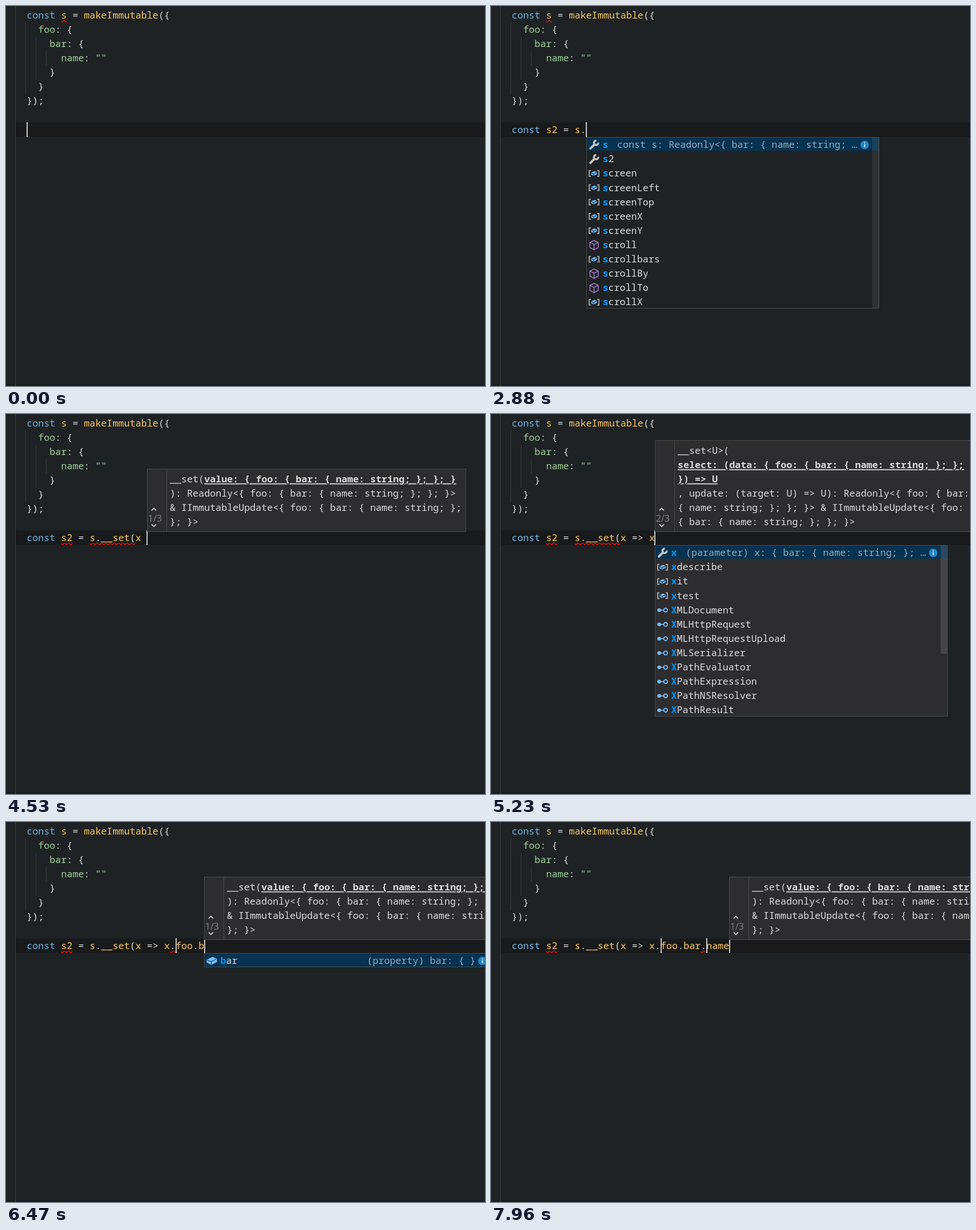
Animation of 839 by 667 pixels, one loop 8000 ms. Source, as an HTML page with a canvas:

```html
<!DOCTYPE html>
<html lang="en">
<head>
<meta charset="utf-8">
<title>Code completion</title>
<style>
html, body { margin: 0; width: 100%; height: 100%; overflow: hidden; background: #1e2224; }
canvas { display: block; }
</style>
</head>
<body>
<canvas id="stage" width="839" height="667"></canvas>
<script>
const g = document.getElementById('stage').getContext('2d');
const LOOP = 8000, SIZE = 16.72, CHAR = SIZE * 0.6, LINE = 25.1, LEFT = 36.2;
const MONO = '"Noto Sans Mono", "DejaVu Sans Mono", monospace';
const WHITE = '#dcdcdc', YELLOW = '#fac863', GREEN = '#9fd39a', BLUE = '#6cb5e4';
const PAGE = '#1e2224', PANEL = '#2d2d30', BORDER = '#4a4a4a', LIGHT_BLUE = '#75beff', GREY = '#c5c5c5';

const HEAD = ['const s = makeImmutable({', '  foo: {', '    bar: {', '      name: ""', '    }', '  }', '});'];
const TYPED = 'const s2 = s.__set(x => x.foo.bar.name';

const row = icon => label => ({ icon, label });
const globals = 'xdescribe xit xtest'.split(' ').map(row('variable'));
const types = ('XMLDocument XMLHttpRequest XMLHttpRequestUpload XMLSerializer XPathEvaluator ' +
  'XPathExpression XPathNSResolver XPathResult').split(' ').map(row('type'));
const starting = [row('keyword')('const'),
  ...('ConstantSourceNode ConstantSourceOptions ConstrainBooleanParameters ConstrainDOMString ' +
  'ConstrainDoubleRange ConstrainULongRange Console').split(' ').map(row('type')),
  row('variable')('console'), row('keyword')('continue'), row('method')('confirm'), row('type')('ConvolverNode')];

const LISTS = {
  con: { rows: starting, detail: 'const' },
  const: { rows: starting.slice(0, 7), detail: 'const' },
  s: {
    detail: 'const s: Readonly<{ bar: { name: string; …',
    rows: 's s2 screen screenLeft screenTop screenX screenY scroll scrollbars scrollBy scrollTo scrollX'
      .split(' ').map((label, i) => row(i < 2 ? 'wrench' : [7, 9, 10].includes(i) ? 'method' : 'variable')(label))
  },
  set: { rows: [row('method')('__set'), row('field')('foo')], detail: '(method) __set(value: { foo: { ba…', right: true },
  xGlobal: { rows: [...globals, ...types, row('type')('XSLTProcessor')], detail: 'function xdescribe', thumb: 190 },
  x: { rows: [row('wrench')('x'), ...globals, ...types], detail: '(parameter) x: { bar: { name: string; }; …', thumb: 190 },
  foo: { rows: [row('field')('foo')], detail: '(property) foo: { bar: { name: stri…', right: true },
  bar: { rows: [row('field')('bar')], detail: '(property) bar: { }', right: true },
  name: { rows: [row('field')('name')], detail: '(property) name: string', right: true }
};

// The part between asterisks is the active parameter.
const HINTS = [null, [
  '__set(*value: { foo: { bar: { name: string; }; }; }*',
  '): Readonly<{ foo: { bar: { name: string; }; }; }>',
  '& IImmutableUpdate<{ foo: { bar: { name: string; };',
  '}; }>'
], [
  '__set<U>(',
  '*select: (data: { foo: { bar: { name: string; }; };*',
  '*}) => U*',
  ', update: (target: U) => U): Readonly<{ foo: { bar:',
  '{ name: string; }; }; }> & IImmutableUpdate<{ foo:',
  '{ bar: { name: string; }; }; }>'
]];

// time, typed characters, completion list, hint number, hint column
const STEPS = [
  [0, 0], [150, 1], [230, 1, 'con'], [470, 2, 'con'], [550, 3, 'con'], [620, 4, 'con'], [700, 5, 'const'],
  [1110, 6], [1250, 7], [1480, 8], [1560, 9], [1870, 10], [2090, 11],
  [2600, 12], [2660, 12, 's'], [2880, 13, 's'], [2980, 13, 'set'], [3430, 18],
  [4040, 19], [4120, 19, '', 1, 19], [4230, 20, '', 1, 20], [4310, 20, 'xGlobal', 1, 20],
  [4450, 21, '', 1, 20], [4530, 21, '', 1, 21], [4590, 22, '', 1, 21], [4670, 22, '', 1, 22],
  [4820, 23, '', 1, 22], [4900, 24, '', 1, 23], [4990, 24, '', 2, 24],
  [5140, 25, '', 2, 24], [5230, 25, 'x', 2, 25], [5310, 26, 'x', 2, 26], [5390, 26, 'foo', 1, 26],
  [5860, 29, '', 1, 26], [6010, 29, '', 1, 29],
  [6160, 30, '', 1, 29], [6240, 30, '', 1, 30], [6320, 30, 'bar', 1, 30], [6400, 31, 'bar', 1, 30], [6470, 31, 'bar', 1, 31],
  [6780, 33, '', 1, 31], [6860, 33, '', 1, 33],
  [7320, 34, '', 1, 33], [7430, 34, 'name', 1, 34], [7870, 38, '', 1, 34], [7960, 38, '', 1, 38]
];

// from, until, line, first column, last column
const ERRORS = [
  [0, 3510, 0, 6, 7], [3600, LOOP, 8, 6, 8], [4450, 5860, 8, 11, 19],
  [5940, 7430, 8, 25, 26], [7960, LOOP, 8, 33, 34]
];
const LEFTOVER_CARETS = [[5860, 26], [7870, 34]];

const colX = col => LEFT + col * CHAR;

function rect(x, y, w, h, color) {
  g.fillStyle = color;
  g.fillRect(x, y, w, h);
}

function text(s, x, y, color, weight = 500) {
  g.font = `${weight} ${SIZE}px ${MONO}`;
  g.fillStyle = color;
  g.fillText(s, x, y);
}

function path(points, color, width, fill) {
  g.beginPath();
  points.forEach(([x, y]) => g.lineTo(x, y));
  if (fill) { g.closePath(); g.fillStyle = color; g.fill(); return; }
  g.strokeStyle = color;
  g.lineWidth = width;
  g.stroke();
}

function code(line, s, word) {
  for (const m of s.matchAll(/\w+|"\w*"|[^\w"]+/g)) {
    const t = m[0];
    const color = t === 'const' ? BLUE : t[0] === '"' ? GREEN : /\w/.test(t) ? word : WHITE;
    text(t, colX(m.index), 21.8 + line * LINE, color);
  }
}

function squiggle(line, from, to) {
  const x = colX(from), w = (to - from) * CHAR, y = 25.6 + line * LINE, points = [];
  for (let i = -1; i * 3.75 < w + 4; i++) points.push([x + 2.2 + i * 3.75, y + (i % 2 ? 0 : 3)]);
  g.save();
  g.beginPath();
  g.rect(x, y - 1, w, 5.4);
  g.clip();
  path(points, '#e60a0a', 1.6);
  g.restore();
}

function caret(col) {
  rect(Math.floor(colX(col)), 204, 2, 26, '#c8c8c8');
}

function brick(s) {
  const p = a => a.map(([x, y]) => [x * s, y * s]);
  path(p([[-9, -2], [1, -7], [9, -4], [9, 2], [-1, 7], [-9, 3]]), LIGHT_BLUE, 0, true);
  path(p([[-8, -1.5], [-1, 1.5], [8, -3.5]]), '#28445e', 1.3);
  path(p([[-1, 1.5], [-1, 6]]), '#28445e', 1.3);
}

function ring(x, r, color, width, from = 0, to = 7) {
  g.beginPath();
  g.arc(x, 0, r, from, to);
  g.strokeStyle = color;
  g.lineWidth = width;
  g.stroke();
}

const ICONS = {
  wrench() {
    g.rotate(-Math.PI / 4);
    g.lineCap = 'round';
    path([[-9, 0], [1, 0]], GREY, 4);
    g.lineCap = 'butt';
    ring(5, 3.8, GREY, 3.4, 0.65, 5.63);
  },
  variable() {
    for (const s of [-1, 1]) path([[s * 5.5, -5], [s * 8.5, -5], [s * 8.5, 5], [s * 5.5, 5]], GREY, 1.5);
    brick(0.58);
  },
  method() {
    const c = '#b180d7';
    path([[0, -8], [7.2, -4.5], [7.2, 4.5], [0, 8.5], [-7.2, 4.5], [-7.2, -4.5], [0, -8], [7.2, -4.5]], c, 1.4);
    path([[-7.2, -4.5], [0, -0.8], [7.2, -4.5]], c, 1.4);
    path([[0, -0.8], [0, 8.5]], c, 1.4);
  },
  type() {
    ring(-6, 1.6, LIGHT_BLUE, 3.2);
    path([[-5, 0], [2, 0]], LIGHT_BLUE, 1.6);
    ring(5.3, 3.3, LIGHT_BLUE, 1.8);
  },
  field() { brick(1); },
  keyword() {
    for (const [x, y, w] of [[-8, -6, 9], [3, -6, 5], [-8, -2, 16], [-8, 2, 6], [0, 2, 8], [-8, 6, 12]])
      rect(x, y - 0.7, w, 1.5, GREY);
  }
};

function panel(x, y, w, h, color) {
  rect(x, y, w, h, BORDER);
  rect(x + 1, y + 1, w - 2, h - 2, color);
}

function matchLength(label, word) {
  let n = 0;
  while (n < word.length && n < label.length && label[n].toLowerCase() === word[n].toLowerCase()) n++;
  return n;
}

function completion({ rows, detail, right, thumb }, col, typed, color) {
  const x = Math.round(colX(col)), y = 230, h = Math.round(rows.length * LINE);
  const word = typed.match(/(\w*)\.?$/)[1];
  panel(x, y, 513, h, color);
  rect(x + 1, y + 1, 511, 23, '#063351');
  rows.forEach(({ icon, label }, i) => {
    const mid = 243.8 + i * LINE, n = matchLength(label, word), lx = x + 28.5;
    g.save();
    g.translate(x + 13.5, mid);
    ICONS[icon]();
    g.restore();
    text(label.slice(0, n), lx, mid + 5.4, '#0097fb', 700);
    text(label.slice(n), lx + n * CHAR, mid + 5.4, WHITE);
  });
  const dx = right ? 475.8 - detail.length * CHAR : 44 + rows[0].label.length * CHAR;
  text(detail, x + dx, 249.2, '#98abb8', 400);

  g.beginPath();
  g.arc(x + 487.5, 243.8, 7.5, 0, 7);
  g.fillStyle = '#1f86c6';
  g.fill();
  rect(x + 486.6, 242.4, 1.8, 5.6, '#d8ecf8');
  rect(x + 486.6, 239.2, 1.8, 1.9, '#d8ecf8');
  if (rows.length > 7) rect(x + 500.5, y + 1, 11.5, thumb || h - 2, `rgba(140,140,140,${thumb ? 0.25 : 0.14})`);
}

function hint(number, col) {
  const lines = HINTS[number], x = Math.round(colX(col)), n = lines.length;
  const top = n > 4 ? 46 : 96;
  panel(x, top, 559, 207 - top, PANEL);
  rect(x + 34, top + 1, 1, 205 - top, BORDER);
  for (const [y, s] of [[167.5, -1], [195.5, 1]])
    path([[x + 8, y - s * 2], [x + 12, y + s * 2], [x + 16, y - s * 2]], '#e0e0e0', 1.6);
  g.font = '16px "Open Sans", "Noto Sans", sans-serif';
  g.fillStyle = '#858585';
  g.fillText(`${number}/3`, x + 1.8, 189.4);

  lines.forEach((line, i) => {
    const y = 194.8 - (n - 1 - i) * 24.9;
    let tx = x + 40;
    line.split('*').forEach((part, k) => {
      const w = part.length * CHAR;
      if (k % 2) {
        // Underline that breaks around descenders.
        rect(tx, y + 1.6, w, 1.8, WHITE);
        g.font = `700 ${SIZE}px ${MONO}`;
        g.strokeStyle = PANEL;
        g.lineWidth = 3;
        g.strokeText(part, tx, y);
      }
      text(part, tx, y, WHITE, k % 2 ? 700 : 500);
      tx += w;
    });
  });
}

function draw(t) {
  const [, n, list, hintNo, hintCol] = STEPS.findLast(s => s[0] <= t);
  const typed = TYPED.slice(0, n);

  rect(0, 0, 839, 667, PAGE);
  rect(0, 664, 839, 3, '#1b1e20');
  rect(17, 204.5, 822, 25.5, '#191a1b');
  rect(16, 0, 1, 667, '#3b3f41');
  for (let i = 0; i < 3; i++) rect(34 + i * 18, 29 + i * LINE, 1, 126 - i * 50.2, '#373b3d');

  HEAD.forEach((line, i) => code(i, line, i ? GREEN : YELLOW));
  code(8, typed, YELLOW);
  for (const [from, until, line, a, b] of ERRORS) if (t >= from && t < until) squiggle(line, a, b);
  for (const [from, col] of LEFTOVER_CARETS) if (t >= from) caret(col);
  caret(n);
  if (hintNo) hint(hintNo, hintCol);
  // A list without a hint above it keeps the page colour.
  if (list) completion(LISTS[list], n, typed, hintNo ? PANEL : PAGE);
}

const start = performance.now();
function tick() {
  draw((performance.now() - start) % LOOP);
  requestAnimationFrame(tick);
}
tick();
</script>
</body>
</html>
```
